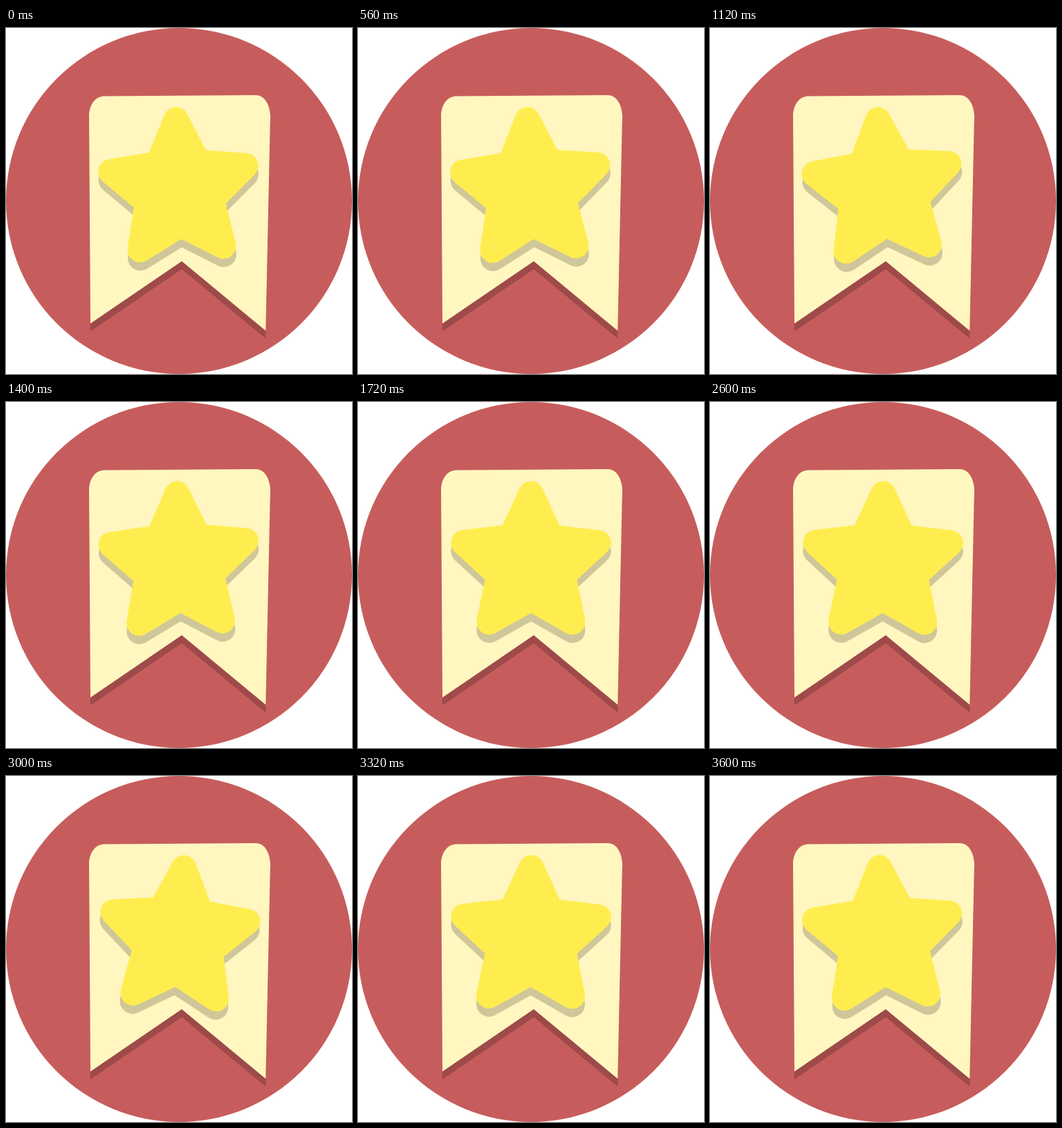
Recreate the animation shown at these times as an HTML page. Size 500 by 500 pixels, loop 3680 ms.

```html
<!DOCTYPE html>
<html lang="en">
<head>
<meta charset="utf-8">
<title>Star bookmark</title>
<style>
  html, body { margin: 0; width: 100%; height: 100%; overflow: hidden; background: #fff; }
  svg { display: block; width: 100vw; height: 100vh; }
</style>
</head>
<body>
<svg viewBox="0 0 500 500">
  <defs>
    <path id="ribbon" d="M120 128C120 112 128 99 142 98.5L361 97C374 97 381 111 382 126L375.3 437.5L254 337L122 427Z"/>
    <path id="star"/>
  </defs>
  <circle cx="250" cy="250" r="250" fill="#c65d5c"/>
  <use href="#ribbon" y="11.5" fill="#9e4a4a"/>
  <use href="#ribbon" fill="#fff6c0"/>
  <g id="swing">
    <use href="#star" x="250" y="247" fill="#cfc799"/>
    <use href="#star" x="250" y="235" fill="#ffed4f"/>
  </g>
</svg>
<script>
  const LOOP = 3680, FRAME = 40, LAST = 3600;
  const INNER = 70, TIP = 102.5, ROUND = 18.3;

  // Turning points of the sway: [ms, degrees]
  const sway = [
    [0, -2.55], [140, -1.6], [1000, -4.7], [1680, 0.1],
    [2240, -4.7], [2920, 4.3], [3680, -3.1]
  ];

  function starPath() {
    const vx = INNER * Math.sin(Math.PI / 5);
    const vy = INNER * Math.cos(Math.PI / 5);
    const rise = TIP - vy;
    const lean = Math.atan2(vx, rise) - Math.asin(ROUND / Math.hypot(vx, rise));
    const tx = ROUND * Math.cos(lean);
    const ty = TIP + ROUND * Math.sin(lean);
    let d = '';
    for (let i = 0; i < 5; i++) {
      const a = i * Math.PI * 2 / 5, c = Math.cos(a), s = Math.sin(a);
      const at = (x, y) => `${(x * c - y * s).toFixed(2)} ${(x * s + y * c).toFixed(2)}`;
      d += `${i ? 'L' : 'M'}${at(-vx, -vy)}L${at(-tx, -ty)}A${ROUND} ${ROUND} 0 0 1 ${at(tx, -ty)}`;
    }
    return d + 'Z';
  }

  function angleAt(t) {
    const i = sway.findIndex(key => key[0] > t);
    const [t0, a0] = sway[i - 1], [t1, a1] = sway[i];
    const p = (t - t0) / (t1 - t0);
    return a0 + (a1 - a0) * (1 - Math.cos(Math.PI * p)) / 2;
  }

  document.getElementById('star').setAttribute('d', starPath());
  const swing = document.getElementById('swing');
  const start = performance.now();

  function draw() {
    const t = Math.max(0, performance.now() - start) % LOOP;
    const step = Math.min(LAST, Math.floor(t / FRAME) * FRAME);
    swing.setAttribute('transform', `rotate(${angleAt(step).toFixed(3)} 250 230)`);
    requestAnimationFrame(draw);
  }
  draw();
</script>
</body>
</html>
```
